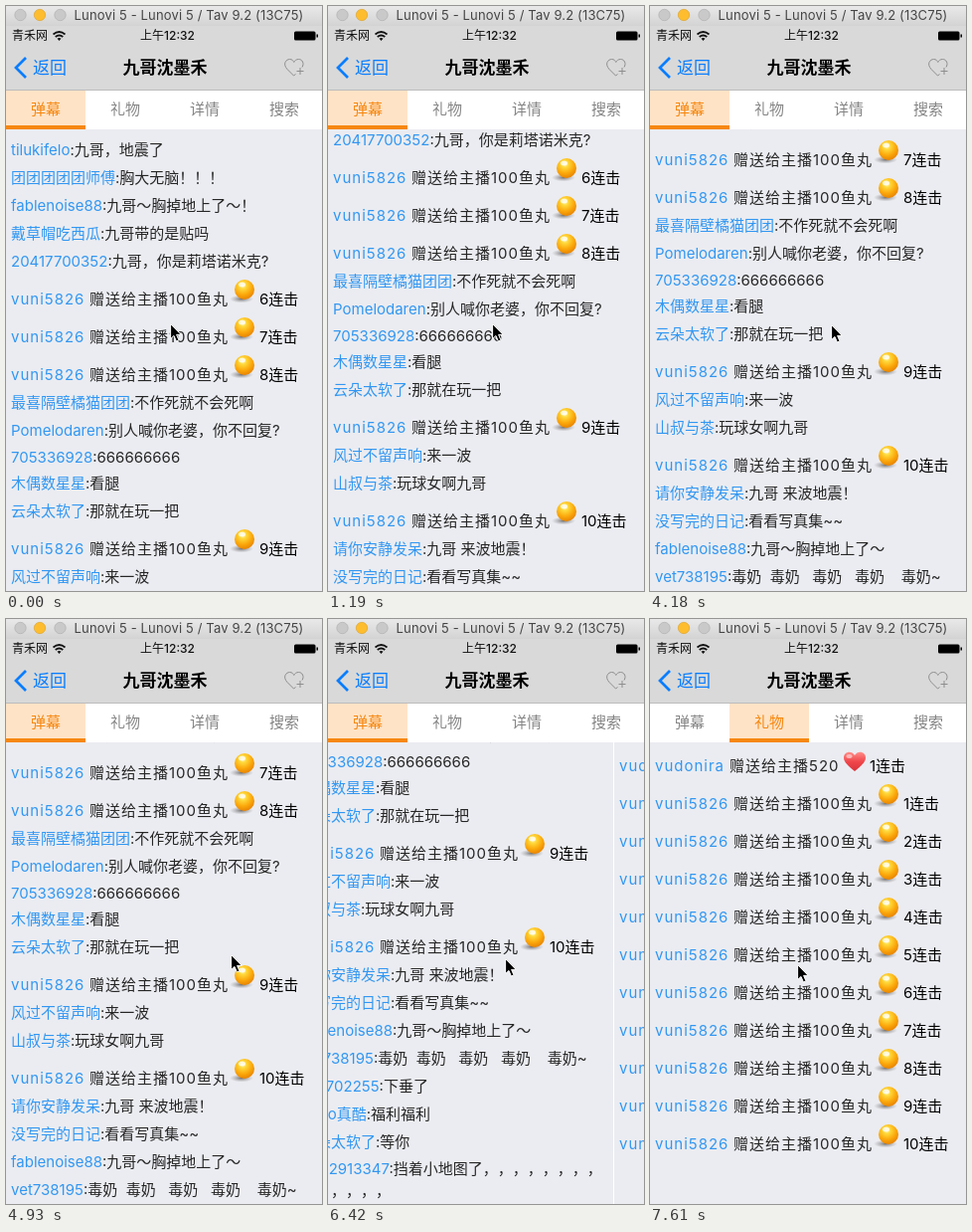
Animation of 318 by 588 pixels, one loop 8 s. Source, as an HTML page:

```html
<!DOCTYPE html>
<html lang="zh-CN">
<head>
<meta charset="utf-8">
<style>
html, body { margin: 0; width: 100%; height: 100%; overflow: hidden; }
body { position: relative; background: #ebecf1; color: #262626; text-spacing-trim: space-all;
  font: 15px Inter, "Noto Sans CJK SC", "Noto Sans CJK", sans-serif; }
#stage { position: absolute; left: 0; top: 0; width: 318px; height: 588px; overflow: hidden; }
#stage div, #stage span.at, svg { position: absolute; white-space: pre; }
svg { left: 0; top: 0; overflow: visible; }
#window { width: 318px; height: 20px; background: linear-gradient(#e9e9e9, #d3d3d3); }
#bar { top: 20px; width: 318px; height: 64px; background: #d9d9d9; border-bottom: 1px solid #bcbcbc; }
.label { transform: translate(-50%, -50%); line-height: 20px; }
.tab { top: 85px; width: 80px; height: 39px; line-height: 38px; text-align: center; background: #fff; color: #858585; }
.tab i { position: absolute; inset: 0; background: #ffe3c6; border-bottom: 4px solid #f6870f;
  box-sizing: border-box; color: #f6870f; font-style: normal; }
#view { top: 124px; width: 318px; height: 464px; overflow: hidden; }
#strip { left: 0; top: 0; width: 640px; height: 464px; }
#chat { left: 0; bottom: 0; width: 320px; }
#gifts { left: 320px; top: -.5px; width: 320px; }
#gap { left: 319px; width: 1px; height: 464px; background: #fff; }
#stage .row { position: relative; width: 320px; }
#stage .row[hidden] { display: none; }
.msg { padding-left: 5px; box-sizing: border-box; }
.gift { height: 38px; line-height: 28px; letter-spacing: 1px; }
.gift .at { top: 10px; }
b { font-weight: 400; color: #3197f2; }
.count { color: #000; letter-spacing: 0; }
</style>
</head>
<body>
<div id="stage">
  <div id="view"><div id="strip"><div id="chat"></div><div id="gifts"></div><div id="gap"></div></div></div>
  <div id="window"></div>
  <div id="bar"></div>
  <svg width="318" height="90">
    <defs>
      <radialGradient id="gold" cx=".42" cy=".3" r=".7">
        <stop offset="0" stop-color="#fff7b0"/><stop offset=".25" stop-color="#ffd83a"/>
        <stop offset=".65" stop-color="#fba90c"/><stop offset="1" stop-color="#e98400"/>
      </radialGradient>
      <radialGradient id="shade">
        <stop offset="0" stop-color="#555" stop-opacity=".8"/><stop offset="1" stop-color="#888" stop-opacity="0"/>
      </radialGradient>
      <linearGradient id="red" x2="0" y2="1">
        <stop offset="0" stop-color="#ff8f8a"/><stop offset=".5" stop-color="#f0474b"/><stop offset="1" stop-color="#d8323a"/>
      </linearGradient>
      <g id="ball">
        <ellipse cx="237" cy="23.5" rx="12" ry="4" fill="url(#shade)"/>
        <circle cx="240" cy="14" r="10" fill="url(#gold)"/>
        <ellipse cx="237.5" cy="9" rx="3.5" ry="2.5" fill="#fff" opacity=".75"/>
      </g>
      <g id="heart">
        <path d="M206 29C200 24 195 20 195 15.500C195 9 203 7.500 206 13C209 7.500 217 9 217 15.500C217 20 212 24 206 29Z" fill="url(#red)"/>
        <ellipse cx="200.500" cy="14" rx="3" ry="2" fill="#fff" opacity=".5"/>
      </g>
    </defs>
    <g stroke-width=".6">
      <circle cx="14.500" cy="9" r="5.700" fill="#c9c9c9" stroke="#aaa"/>
      <circle cx="34" cy="9" r="5.700" fill="#fdbd2e" stroke="#dc9e25"/>
      <circle cx="54.500" cy="9" r="5.700" fill="#c9c9c9" stroke="#aaa"/>
    </g>
    <g fill="none" stroke="#111" stroke-width="1.700">
      <path d="M47.500 28.500Q53.500 23.500 59.500 28.500M49.700 31Q53.500 28 57.300 31"/>
      <path d="M53.500 35L51.500 32.700Q53.500 31.300 55.500 32.700Z" fill="#111" stroke="none"/>
    </g>
    <rect x="290" y="25.500" width="21.500" height="9" rx="1.500"/>
    <path d="M312.500 28.500H314V31.500H312.500Z"/>
    <path d="M20 52L10 62L20 72" fill="none" stroke="#087dff" stroke-width="2.700"/>
    <g fill="none" stroke="#8d8d8d" stroke-width="1">
      <path d="M291.500 68.500L289.500 70L283 63.500C278 58 282 53.500 285.500 53.500C288 53.500 289 55 289.800 56.500C290.500 55 292 53.500 294.500 53.500C298 53.500 300.500 57.500 298 61.500"/>
      <path d="M292.500 65.500H299.500M296 62V69"/>
    </g>
  </svg>
  <div class="label" style="left:184px;top:9px;font-size:13px;letter-spacing:.15px;color:#454545">Lunovi 5 - Lunovi 5 / Tav 9.2 (13C75)</div>
  <div class="label" style="left:24px;top:30px;font-size:12px;color:#111">青禾网</div>
  <div class="label" style="left:162.500px;top:30px;font-size:12px;font-weight:500;color:#111">上午12:32</div>
  <div class="label" style="left:44px;top:62px;font-size:17px;color:#087dff">返回</div>
  <div class="label" style="left:160px;top:62px;font-size:17px;font-weight:700;color:#000">九哥沈墨禾</div>
  <svg id="cursor" width="12" height="19">
    <path d="M.6 .6V15.500L4 12.400L6.400 18L9 16.900L6.600 11.400H11.200Z" fill="#000" stroke="#fff" stroke-width="1"/>
  </svg>
</div>
<script>
const $ = id => document.getElementById(id);
const LOOP = 8000, FAN = 'vuni5826';

// A number stands for a gift with that combo count.
const messages = [
  'tilukifelo:九哥，地震了', '团团团团团师傅:胸大无脑！！！', 'fablenoise88:九哥～胸掉地上了～！',
  '戴草帽吃西瓜:九哥带的是贴吗', '20417700352:九哥，你是莉塔诺米克?', 6, 7, 8,
  '最喜隔壁橘猫团团:不作死就不会死啊', 'Pomelodaren:别人喊你老婆，你不回复?',
  '705336928:666666666', '木偶数星星:看腿', '云朵太软了:那就在玩一把', 9,
  '风过不留声响:来一波', '山叔与茶:玩球女啊九哥', 10, '请你安静发呆:九哥 来波地震！',
  '没写完的日记:看看写真集~~', 'fablenoise88:九哥～胸掉地上了～',
  'vet738195:毒奶  毒奶   毒奶   毒奶    毒奶~', '418702255:下垂了', 'nono真酷:福利福利',
  '云朵太软了:等你', '5062913347:挡着小地图了，，，，，，，，\n，，，，，，'
];
const arrivals = [290, 890, 890, 1190, 1480, 1780, 5230, 5530, 5830, 6270];
const first = messages.length - arrivals.length;

// time, page offset
const swipe = [[0, 0], [6420, 32], [6570, 120], [6710, 186], [7010, 256], [7160, 315], [7310, 320]];
// time, x, y
const pointer = [
  [0, 165, 319], [4180, 182, 320], [4330, 198, 327], [4480, 205, 332], [4630, 213, 336],
  [4780, 226, 338], [4930, 226, 337], [5230, 228, 337], [5530, 229, 337], [5680, 238, 339],
  [5830, 238, 340], [6270, 212, 341], [6420, 178, 341], [6570, 90, 347], [6710, 24, 352],
  [7010, 22, 353], [7460, 148, 348], [7610, 148, 347]
];

function addRow(parent, className, html) {
  const row = document.createElement('div');
  row.className = 'row ' + className;
  row.innerHTML = html;
  parent.append(row);
  return row;
}

function addGift(parent, name, text, textX, icon, countX, count) {
  const at = (x, s, c = '') => `<span class="at ${c}" style="left:${x}px">${s}</span>`;
  return addRow(parent, 'gift', at(5, `<b>${name}</b>`) + at(textX, text) +
    `<svg width="320" height="38"><use href="#${icon}"/></svg>` + at(countX, count + '连击', 'count'));
}

const addBall = (parent, n) => addGift(parent, FAN, '赠送给主播100鱼丸', 84, 'ball', 255, n);

function addMessage(text) {
  const [name, body] = text.split(':');
  const row = addRow($('chat'), 'msg', `<b>${name}</b>:${body}`);
  const lines = body.split('\n').length;
  const height = /^\d+$/.test(body) ? 25 : 28;
  row.style.lineHeight = (lines > 1 ? 22 : height) + 'px';
  row.style.height = (lines > 1 ? 48 : height) + 'px';
  if (lines > 1) row.style.paddingTop = '2px';
  return row;
}

const rows = messages.map(m => typeof m === 'number' ? addBall($('chat'), m) : addMessage(m));
addGift($('gifts'), 'vudonira', '赠送给主播520', 80, 'heart', 221, 1);
for (let n = 1; n <= 10; n++) addBall($('gifts'), n);

const marks = ['弹幕', '礼物', '详情', '搜索'].map((name, i) => {
  const tab = document.createElement('div');
  tab.className = 'tab';
  tab.style.left = i * 80 + 'px';
  tab.innerHTML = `${name}<i>${name}</i>`;
  $('stage').insertBefore(tab, $('cursor'));
  return tab.lastChild;
});

const current = (steps, t) => steps.findLast(s => s[0] <= t);

function draw(now) {
  const t = now % LOOP;
  const shown = first + arrivals.filter(a => a <= t).length;
  rows.forEach((row, i) => row.hidden = i >= shown);

  const [since, offset] = current(swipe, t);
  $('strip').style.transform = `translateX(${-offset}px)`;
  $('gap').hidden = since !== 6420 && since !== 7160;

  const second = t < 7310 ? 0 : t < 7460 ? .5 : 1;
  [t < 7310 ? 1 : 0, second, 0, 0].forEach((v, i) => marks[i].style.opacity = v);

  const [, x, y] = current(pointer, t);
  $('cursor').style.transform = `translate(${x}px, ${y}px)`;
  requestAnimationFrame(draw);
}
draw(0);
</script>
</body>
</html>
```
